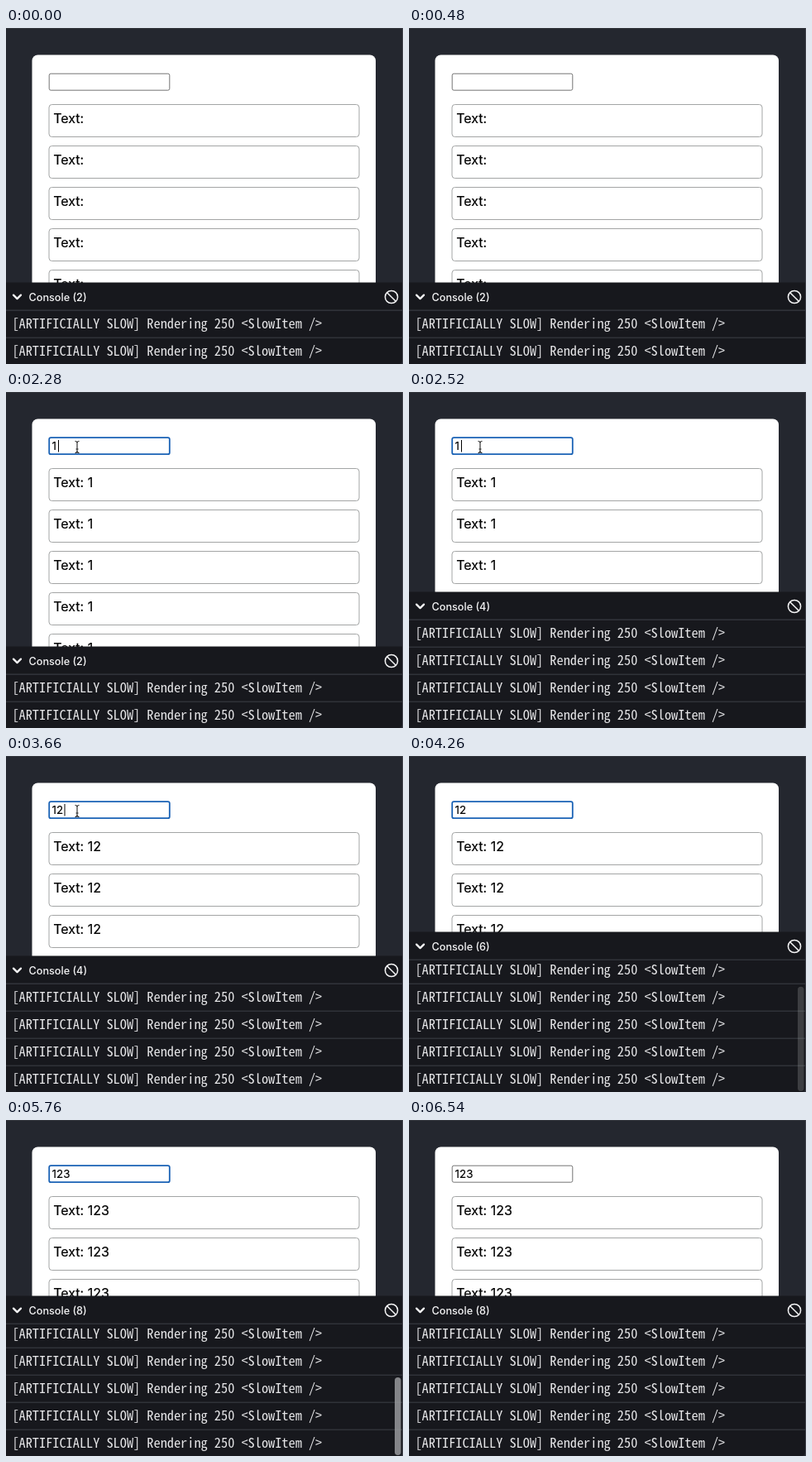
Animation of 480x406 px, one loop 6600 ms. Source, as an HTML page:

```html
<!DOCTYPE html>
<html lang="en">
<head>
<meta charset="utf-8">
<title>Slow list</title>
<style>
  html, body { margin: 0; width: 100%; height: 100%; overflow: hidden; background: #24272f; }
  svg { display: block; width: 480px; height: 406px; }
  text { white-space: pre; }
  .item { font: 16px Inter, sans-serif; fill: #000; stroke: #000; stroke-width: .2; }
  .typed { font: 13.333px Inter, sans-serif; fill: #000; stroke: #000; stroke-width: .15; }
  .head { font: 500 12.65px Inter, sans-serif; fill: #f4f4f5; }
  .log { font-family: "Noto Sans Mono CJK JP", "Noto Sans Mono", monospace; fill: #e6e6e8; }
  .icon { fill: none; stroke: #f4f4f5; }
</style>
</head>
<body>
<svg id="stage" viewBox="0 0 480 406">
  <defs>
    <clipPath id="view"><rect id="viewBox" x="0" width="480" height="406"/></clipPath>
  </defs>
  <rect width="480" height="406" fill="#24272f"/>
  <rect width="480" height="1" fill="#33363d"/>
  <rect x="31.5" y="32.5" width="415.5" height="390" rx="7" fill="#fff"/>
  <g id="items"></g>

  <rect id="field" x="52.2" y="55.2" width="145.6" height="20" rx="2" fill="#fff"/>
  <text id="typed" class="typed" x="55.6" y="69.8"></text>
  <rect id="caret" y="58" width="1" height="14.5" fill="#000"/>
  <path id="beam" d="M83.5 59.5Q86 59.5 86 61.5V71.5Q86 73.5 83.5 73.5M88.5 59.5Q86 59.5 86 61.5M88.5 73.5Q86 73.5 86 71.5M84.5 69H87.5"
        fill="none" stroke="#222" stroke-width="1.1"/>

  <g id="panel">
    <rect y="-.5" width="479" height="200" fill="#17181d"/>
    <path class="icon" d="M9 14.6L13.5 19.1L18 14.6" stroke-width="2.3" stroke-linecap="round" stroke-linejoin="round"/>
    <text id="title" class="head" x="27.5" y="21.8"></text>
    <circle class="icon" cx="466" cy="17" r="7.6" stroke-width="1.5"/>
    <path class="icon" d="M460.7 11.7L471.3 22.3" stroke-width="1.5"/>
    <rect y="32.5" width="479" height="1.5" fill="#303239"/>
  </g>
  <g id="logs" clip-path="url(#view)"></g>
  <rect id="thumb" x="470" width="7.5" rx="3.75" fill="#9a9b9e"/>
  <path d="M480 401V406H475Q479 405.5 479 401Z" fill="#24272f"/>
  <rect x="479" width="1" height="406" fill="#3d3f48"/>
</svg>
<script>
const LOOP = 6600, ROW = 33, BOTTOM = 406, MIN_TOP = 213, LOG_ADVANCE = 8.15;
const $ = id => document.getElementById(id);

function add(parent, tag, attrs, text = '') {
  const el = document.createElementNS('http://www.w3.org/2000/svg', tag);
  for (const k in attrs) el.setAttribute(k, attrs[k]);
  el.textContent = text;
  parent.append(el);
  return el;
}

const labels = [];
for (let i = 0; i < 5; i++) {
  const y = 92.5 + i * 50;
  add($('items'), 'rect', { x: 52, y, width: 375, height: 39, rx: 3.5, fill: '#fff', stroke: '#a3a5a5' });
  labels.push(add($('items'), 'text', { class: 'item', x: 57.2, y: y + 22.8 }));
}

const rows = [];
for (let i = 0; i < 5; i++) {
  const y = 374 - i * ROW, row = add($('logs'), 'g', {});
  add(row, 'rect', { x: 0, y: y - 0.5, width: 479, height: 1.5, fill: '#303239' });
  add(row, 'text', { class: 'log', x: 7.4, y: y + 21.5 }, '[ARTIFICIALLY SLOW] Rendering 250 <SlowItem />');
  rows.push(row);
}

// Font size that gives the monospace font its character pitch
const pen = document.createElement('canvas').getContext('2d');
pen.font = '100px ' + getComputedStyle(rows[0].lastChild).fontFamily;
$('logs').setAttribute('font-size', 100 * LOG_ADVANCE / pen.measureText('M').width);

// Latest value whose start time has passed
const at = (t, steps) => steps.reduce((v, [start, value]) => t >= start ? value : v, null);
const show = (el, on) => el.setAttribute('visibility', on ? 'visible' : 'hidden');
const fade = (t, from, to) => Math.max(0, Math.min(1, (to - t) / (to - from))) ** 2;

const TYPED = [[0, ''], [2280, '1'], [3660, '12'], [5280, '123']];
const COUNT = [[0, 2], [2520, 4], [3900, 6], [5460, 8]];
const CARET = [[0, 0], [780, 1], [1380, 0], [1740, 1], [2700, 0], [2940, 1], [3900, 0], [4800, 1], [5460, 0]];

function draw(t) {
  const typed = at(t, TYPED), count = at(t, COUNT);

  for (const label of labels) label.textContent = 'Text: ' + typed;
  $('typed').textContent = typed;

  const focus = t >= 780 && t < 6540;
  $('field').setAttribute('stroke', focus ? '#1a62b5' : '#747474');
  $('field').setAttribute('stroke-width', focus ? 1.8 : 1);
  show($('caret'), at(t, CARET));
  $('caret').setAttribute('x', 55.5 + typed.length * 7.5);
  show($('beam'), t >= 720 && t < 3900);

  const top = Math.max(MIN_TOP, BOTTOM + 1 - (count + 1) * ROW);
  const body = top + ROW;
  $('panel').setAttribute('transform', `translate(0 ${top})`);
  $('title').textContent = `Console (${count})`;
  $('viewBox').setAttribute('y', body - 0.5);
  rows.forEach((row, i) => show(row, i < count));

  const view = BOTTOM - body;
  const len = view * view / (count * ROW) - 3;
  const alpha = t >= 5460 ? fade(t, 5700, 6420) : t >= 3960 ? fade(t, 3960, 4620) : 0;
  $('thumb').setAttribute('y', BOTTOM - 1 - len);
  $('thumb').setAttribute('height', len);
  $('thumb').setAttribute('opacity', alpha);
}

const begin = performance.now();
function tick() {
  draw((performance.now() - begin) % LOOP);
  requestAnimationFrame(tick);
}
draw(0);
requestAnimationFrame(tick);
</script>
</body>
</html>
```
